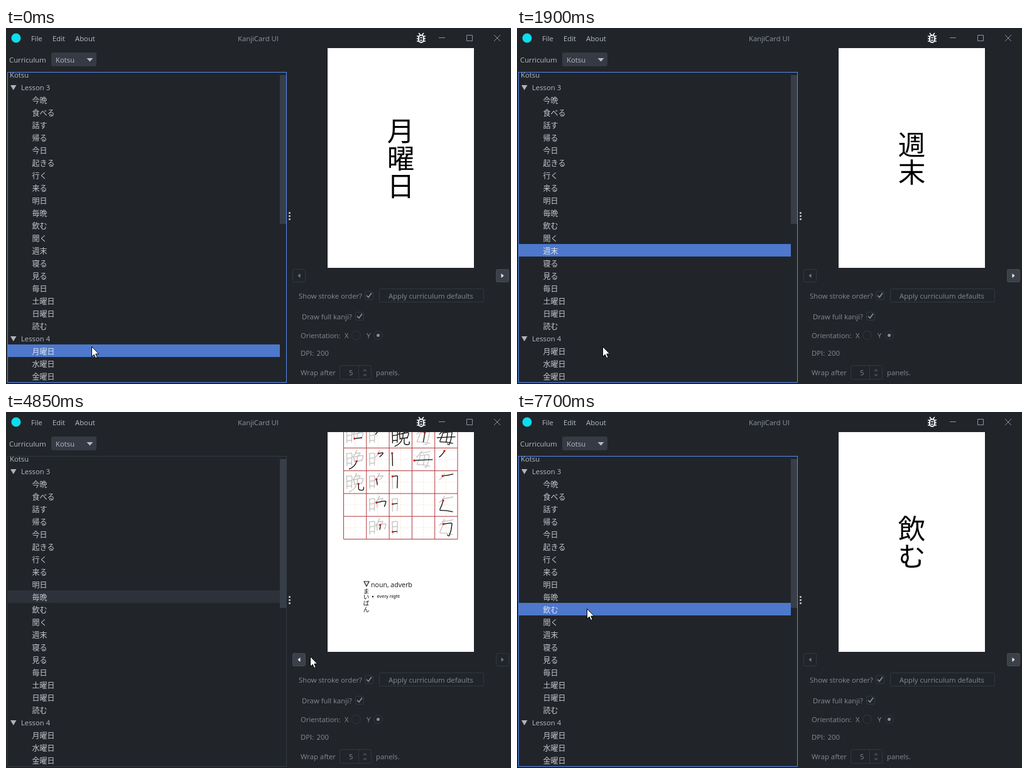
An HTML page with a canvas that plays this animation: 804 px wide and 567 px high, repeating every 8 s.

```html
<!DOCTYPE html>
<html lang="ja">
<head>
<meta charset="utf-8">
<title>KanjiCard UI</title>
<style>
html, body { margin: 0; width: 100%; height: 100%; overflow: hidden; background: #21252a; }
canvas { display: block; }
</style>
</head>
<body>
<canvas id="stage" width="804" height="567" lang="ja"></canvas>
<script>
const c = document.getElementById('stage').getContext('2d');
const LOOP = 8000, TICK = 50;
const BG = '#21252a', TEXT = '#b6bbc3', DIM = '#868a91', EDGE = '#32373f', BUTTON = '#3b4049';
const UI = '11.3px "Open Sans", "Noto Sans", sans-serif';
const CJK = '"Noto Sans CJK JP", "Noto Sans CJK", sans-serif';
const COURSE = 'Kotsu';

const rows = ('今晩 食べる 話す 帰る 今日 起きる 行く 来る 明日 毎晩 飲む 聞く 週末 寝る 見る ' +
  '毎日 土曜日 日曜日 読む Lesson_4 月曜日 水曜日 金曜日').split(' ');
const HEADING = 19;

// time, selected row
const picks = [[0, 20], [450, 19], [900, 18], [1100, 17], [1300, 16], [1800, 15], [1850, 14],
  [1900, 12], [2000, 11], [2150, 10], [2300, 9], [7050, 11], [7700, 10]];

// time, x, y of the pointer
const path = [[0, 136, 507], [2600, 136, 507], [2700, 215, 496], [2900, 661, 427], [3000, 735, 404],
  [3150, 781, 381], [3400, 787, 391], [4050, 787, 391], [4150, 768, 395], [4500, 590, 398],
  [4850, 484, 389], [4900, 481, 387], [4950, 481, 387], [5100, 468, 393], [5250, 468, 393],
  [5500, 290, 387], [5750, 100, 347], [5800, 80, 350], [5900, 43, 353], [6100, 84, 333],
  [6400, 84, 333], [6450, 84, 332], [7250, 84, 332], [7450, 97, 325], [7650, 111, 313], [8000, 111, 313]];

// strokes in a 109 unit square
const mai = ['M46 14C42 23 34 33 22 43', 'M37 25C52 23 70 20 87 16',
  'M40 33C37 48 31 62 25 74c-2 5 0 6 5 6C48 80 66 82 85 87',
  'M41 37C53 35 65 33 77 32c4 0 6 2 5 6C80 60 76 76 70 91c-2 4-5 3-10-2',
  'M61 37C60 50 57 66 54 80', 'M11 60C35 58 65 57 97 56'];
const ban = ['M14 25C16 42 16 62 16 85', 'M16 27C24 26 30 25 36 24c3 0 4 2 4 5C39 50 39 66 38 82',
  'M17 50L38 47', 'M17 74L37 72', 'M63 11C59 24 52 34 44 44',
  'M58 26C65 25 72 24 76 23c4 0 4 2 2 5C74 34 69 38 64 42', 'M48 41C50 49 51 58 52 67',
  'M49 43C62 40 77 37 89 36c4 0 5 2 4 5C91 49 89 55 86 62', 'M66 41C67 48 66 56 64 63',
  'M52 64L87 60', 'M62 64C58 80 46 93 27 101',
  'M71 63C72 72 71 80 72 87c1 5 6 6 13 6c11 0 12-3 11-14'];
const start = d => d.match(/\d+/g).slice(0, 2).map(Number);

function text(s, x, y, color = TEXT, font = UI) {
  c.font = font;
  c.fillStyle = color;
  c.fillText(s, x, y);
}
function rect(x, y, w, h, color) {
  c.fillStyle = color;
  c.fillRect(x, y, w, h);
}
function box(x, y, w, h, line, fill) {
  c.beginPath();
  c.roundRect(x + .5, y + .5, w - 1, h - 1, 2);
  if (fill) { c.fillStyle = fill; c.fill(); }
  c.strokeStyle = line;
  c.lineWidth = 1;
  c.stroke();
}
function line(d, color, width = 1) {
  c.strokeStyle = color;
  c.lineWidth = width;
  c.stroke(new Path2D(d));
}
function fill(d, color) {
  c.fillStyle = color;
  c.fill(new Path2D(d));
}
function dot(x, y, r, color) {
  c.beginPath();
  c.arc(x, y, r, 0, 7);
  c.fillStyle = color;
  c.fill();
}
function ring(x, y, r, color) {
  c.beginPath();
  c.arc(x, y, r, 0, 7);
  c.strokeStyle = color;
  c.lineWidth = 1;
  c.stroke();
}

function bug() {
  const w = '#f4f5f6';
  c.save();
  c.translate(661, 16);
  c.beginPath();
  c.roundRect(-4, -4.5, 8, 11.5, 4);
  c.strokeStyle = w;
  c.lineWidth = 2;
  c.stroke();
  line('M-4 -8L-1.5 -5M4 -8L1.5 -5M-7 -3H-4M7 -3H4M-7 1H-4M7 1H4M-7 5H-4M7 5H4M-2 -.5H2M-2 3.5H2', w, 1.7);
  c.restore();
}

function titleBar() {
  dot(16, 16, 7.5, '#0fdcec');
  text('File', 40, 21);
  text('Edit', 74, 21);
  text('About', 110, 21);
  text('KanjiCard UI', 369, 21, '#8f949c');
  bug();
  line('M689 15.5H699M733.5 11.5H742.5V20.5H733.5ZM777 11L787 21M787 11L777 21', '#90949b');
  text('Curriculum', 5, 55);
  box(72, 39, 72, 22, '#353a44', '#353a44');
  text(COURSE, 79, 55);
  fill('M128.5 48H138.5L133.5 53.5Z', '#b6bbc3');
}

function list(sel, focus) {
  c.save();
  c.beginPath();
  c.rect(3, 71, 443, 493);
  c.clip();
  rect(3, 104 + sel * 20, 433, 20, focus ? '#4d78cc' : '#2c313a');
  text(COURSE, 6, 79);
  const fold = (label, y) => {
    fill(`M7 ${y - 4}H16.5L11.75 ${y + 4}Z`, '#b0b4ba');
    text(label, 24, y + 4, TEXT);
  };
  fold('Lesson 3', 95);
  rows.forEach((word, i) => {
    const y = 115 + i * 20;
    if (i === HEADING) fold(word.replace('_', ' '), y);
    else text(word, 41.5, y + 4.5, i === sel && focus ? '#e2e6ee' : '#c3c6cb', '12px ' + CJK);
  });
  rect(436, 75, 10, 237, '#383e48');
  c.restore();
  c.strokeStyle = focus ? '#568af2' : '#343a43';
  c.lineWidth = 1;
  c.strokeRect(2.5, 70.5, 444, 494);
  for (let i = 0; i < 3; i++) dot(451.5, 294.5 + i * 5, 1.6, '#c2c5ca');
}

function cell(x, y, s, strokes, n) {
  c.save();
  c.translate(x, y);
  c.scale(s / 109, s / 109);
  c.lineCap = c.lineJoin = 'round';
  strokes.forEach((d, i) => {
    if (n < 0 || i === n) line(d, '#111', 4);
    else if (i < n) line(d, '#c3c3c3', 4);
  });
  if (n >= 0) dot(...start(strokes[n]), 5, '#d01818');
  c.restore();
}

function strokePage() {
  const x0 = 537.5, y0 = 21, s = 36.3, end = x0 + 5 * s;
  c.setLineDash([3, 2]);
  for (let i = 0; i < 5; i++) {
    const m = (i + .5) * s;
    line(`M${x0 + m} ${y0}V${y0 + 5 * s}M${x0} ${y0 + m}H${end}`, '#f4e6cb', .8);
  }
  c.setLineDash([]);
  for (let i = 0; i < 6; i++)
    line(`M${x0 + i * s} ${y0}V${y0 + 5 * s}M${x0} ${y0 + i * s}H${end}`, '#b03a3e', 1);

  // each character fills columns from the right, full form first
  let col = 4;
  for (const strokes of [mai, ban]) {
    for (let k = 0; k <= strokes.length; k++)
      cell(x0 + (col - Math.floor(k / 5)) * s, y0 + (k % 5) * s, s, strokes, k - 1);
    col -= Math.ceil((strokes.length + 1) / 5);
  }

  line('M570 270H578L574 277.5Z', '#111', 1.1);
  text('noun, adverb', 581, 279, '#111', '10.6px "Open Sans", "Noto Sans", sans-serif');
  dot(584, 294, 1.2, '#111');
  text('every night', 590.5, 296, '#111', '7.4px "Liberation Sans", sans-serif');
  [...'まいばん'].forEach((k, i) => text(k, 568.8, 288.5 + i * 9.7, '#111', '9.6px ' + CJK));
}

function card(sel, back) {
  if (sel === HEADING) return;
  c.save();
  c.beginPath();
  c.rect(512, 32, 233, 350);
  c.clip();
  rect(512, 32, 233, 350, '#fff');
  if (back) strokePage();
  else {
    const word = [...rows[sel]], size = 43.6;
    word.forEach((k, i) => {
      const mid = 207.5 + (i - (word.length - 1) / 2) * size;
      text(k, 628.5 - size / 2, mid + size * .38, '#000', size + 'px ' + CJK);
    });
  }
  c.restore();
}

function arrowButton(x, dir, on, hover) {
  box(x, 384, 21, 21, on ? '#464b55' : EDGE, on ? (hover ? '#474d58' : BUTTON) : null);
  const m = x + 10.5;
  fill(`M${m - dir * 2} 391V398L${m + dir * 2} 394.5Z`, on ? '#f0f2f4' : '#747981');
}
function check(x, y) {
  box(x, y, 14, 14, EDGE);
  line(`M${x + 3} ${y + 7}L${x + 6} ${y + 10}L${x + 11} ${y + 3}`, '#8a8e95', 1.7);
}

function controls(sel, back, p) {
  const over = x => p[0] >= x && p[0] < x + 21 && p[1] >= 384 && p[1] < 405;
  arrowButton(456, -1, back, over(456));
  arrowButton(780, 1, !back && sel !== HEADING, over(780));
  text('Show stroke order?', 466, 431, DIM);
  check(571, 419);
  box(594, 415, 167, 22, EDGE);
  text('Apply curriculum defaults', 609, 431, DIM);
  text('Draw full kanji?', 471, 464, DIM);
  check(556, 452);
  text('Orientation:', 469, 494, DIM);
  text('X', 539, 494, DIM);
  ring(557.5, 489.5, 7, EDGE);
  text('Y', 574, 494, DIM);
  ring(592.5, 489.5, 7, EDGE);
  dot(592.5, 489.5, 2.5, '#8a8e95');
  text('DPI:', 469, 522, DIM);
  text('200', 494.5, 522, DIM);
  text('Wrap after', 469, 553, DIM);
  box(531, 537, 51, 23, EDGE);
  line('M561.5 538V559', EDGE);
  text('5', 546, 553, DIM);
  fill('M568 546.5H575L571.5 543ZM568 551.5H575L571.5 555Z', '#484d55');
  text('panels.', 589, 553, DIM);
}

function pointer([x, y]) {
  c.save();
  c.translate(x + .5, y + .5);
  const d = 'M0 0V16L3.7 12.6L6.2 18.2L8.7 17.1L6.3 11.6H11.2Z';
  fill(d, '#fff');
  line(d, '#000', 1);
  c.restore();
}
function pointerAt(t) {
  const i = Math.max(1, path.findIndex(k => k[0] > t));
  const a = path[i - 1], b = path[i], u = (t - a[0]) / (b[0] - a[0]);
  return [1, 2].map(j => Math.round(a[j] + (b[j] - a[j]) * u));
}

function draw(now) {
  const t = Math.floor(now % LOOP / TICK) * TICK;
  const sel = picks.filter(k => k[0] <= t).pop()[1];
  const focus = t < 3550 || t >= 7050;
  const back = t >= 3650 && t < 5200;
  const p = pointerAt(t);
  rect(0, 0, 804, 567, BG);
  titleBar();
  list(sel, focus);
  card(sel, back);
  controls(sel, back, p);
  pointer(p);
  requestAnimationFrame(draw);
}
requestAnimationFrame(draw);
</script>
</body>
</html>
```
